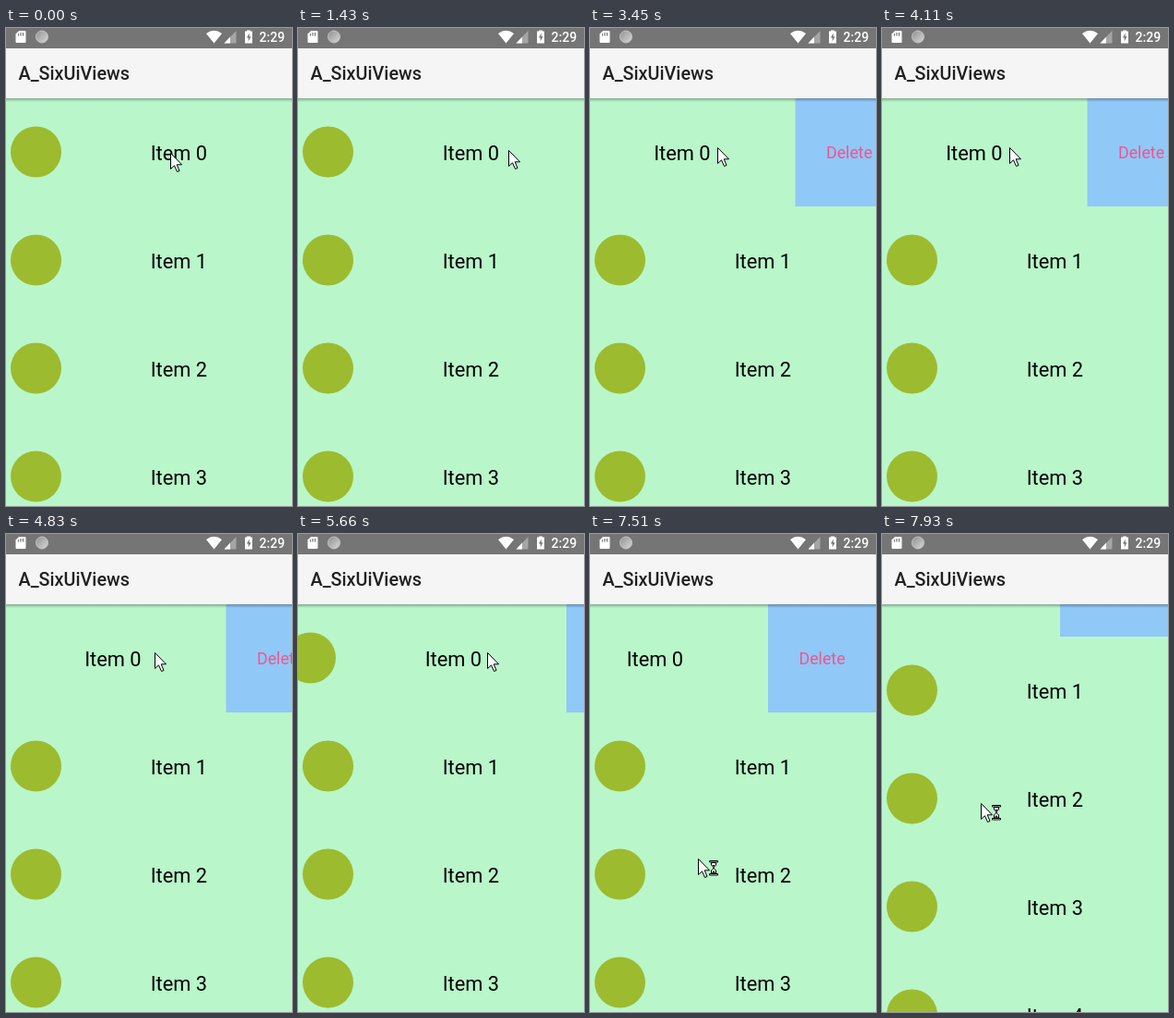
Write an HTML page that moves like this. It is 310 by 517 pixels and loops after 7990 ms.

```html
<!DOCTYPE html>
<html lang="en">
<head>
<meta charset="utf-8">
<title>Swipe to delete</title>
<style>
  html, body { margin: 0; width: 100%; height: 100%; overflow: hidden; background: #b9f6ca; }
  svg { display: block; width: 310px; height: 517px; font-family: Roboto, "Open Sans", sans-serif; }
</style>
</head>
<body>
<svg viewBox="0 0 310 517">
  <defs>
    <linearGradient id="shade" x2="0" y2="1">
      <stop offset="0" stop-color="#000" stop-opacity=".3"/>
      <stop offset="1" stop-color="#000" stop-opacity="0"/>
    </linearGradient>
    <linearGradient id="ball" x2="1" y2="1">
      <stop offset="0" stop-color="#909090"/>
      <stop offset="1" stop-color="#d8d8d8"/>
    </linearGradient>
  </defs>

  <rect width="310" height="517" fill="#b9f6ca"/>
  <g id="list"></g>

  <rect y="76" width="310" height="4" fill="url(#shade)"/>
  <rect y="22" width="310" height="54" fill="#f5f5f5"/>
  <text x="13.5" y="56" font-size="19.8" font-weight="500" fill="#212121">A_SixUiViews</text>

  <rect width="310" height="22" fill="#757575"/>
  <g fill="#fff">
    <path d="M14 3h6.5q1 0 1 1v11q0 1-1 1h-9q-1 0-1-1V6.500z"/>
    <path d="M13.5 6v2.5M16 5v3.5M18.500 5v3.500" stroke="#757575" stroke-width="1.2"/>
    <circle cx="39" cy="9.5" r="6.5" fill="url(#ball)" stroke="#c4c4c4"/>
    <path d="M225.5 16.5L217 6q8.5-6.5 17 0z"/>
    <path d="M249.5 3v13.5h-13z" opacity=".35"/>
    <path d="M243 9.500v7h-6.500z"/>
    <path d="M261 3.500v-1h4v1h2v13h-8v-13z"/>
    <path d="M263.700 5.500l-2.700 5h1.700v4l2.800-5.300h-1.800z" fill="#757575"/>
    <text x="274.500" y="15" font-size="14" font-weight="500">2:29</text>
  </g>

  <g id="cursor">
    <path d="M.5 .5V17.500L4.500 13.800L7.500 20.500L10 19.500L7.200 12.800H12.500Z" fill="#fff" stroke="#000"/>
    <g id="busy" fill="#fff" stroke="#000">
      <path d="M14.500 4.500v2.500l3 3l-3 3v3h5v-3l-3-3l3-3v-2.500z"/>
      <path d="M12.500 2.500h9v1.500h-9zM12.500 16.500h9v1.500h-9z"/>
      <path d="M15.500 7h3l-1.500 2zM15 15.500l2-2.500l2 2.500z" fill="#000" stroke="none"/>
    </g>
  </g>
</svg>
<script>
const LOOP = 7990, STEP = 59.7, ANCHOR = 7930, ROW = 117;
const OPEN = 117, LAG = 45;
const $ = id => document.getElementById(id);

// Tracks are turning points [time, value], joined by cosine easing.
const wiggle = Array.from({ length: 7 }, (_, i) => [2530 + 330 * i, i % 2 ? 84 : OPEN]);
const swipe = [[1430, 0], ...wiggle, [5200, 12], [5400, 20], [5600, 20],
  [6020, 0], [6200, 0], [6920, OPEN]];
const hand = [[910, 178], [1250, 228], [1430, 228], [1550, 222],
  [7000, 222], [7512, 234], [7930, 224]];
const height = [[910, 135], [1250, 132], [2000, 129], [7000, 128], [7660, 381], [8000, 281]];

function at(track, t) {
  const i = track.findIndex(k => k[0] > t);
  if (i < 0) return track[track.length - 1][1];
  if (i === 0) return track[0][1];
  const [t0, a] = track[i - 1], [t1, b] = track[i];
  return a + (b - a) * (1 - Math.cos(Math.PI * (t - t0) / (t1 - t0))) / 2;
}

const row = n => {
  const y = n * ROW;
  return `<g id="row${n}">
    <circle cx="32.5" cy="${y + 134}" r="27.5" fill="#9cbb2f"/>
    <text x="156.7" y="${y + 143}" font-size="21.8">Item ${n}</text>
    ${n ? "" : `<rect x="310" y="76" width="117" height="117" fill="#90c8f8"/>
    <text x="343.500" y="141" font-size="17.800" fill="#f0568c">Delete</text>`}
  </g>`;
};
$("list").innerHTML = [0, 1, 2, 3, 4].map(row).join("");

const move = (id, x, y) => $(id).setAttribute("transform", `translate(${x} ${y})`);

function draw(now) {
  // the screen refreshes in steps
  const t = ANCHOR + Math.floor((now + 10 - ANCHOR) / STEP) * STEP;
  // the row trails the hand that drags it
  const x = at(hand, t) - at(swipe, t + LAG), y = at(height, t);
  const scroll = t > 7660 ? Math.max(0, 373 - y) : 0;
  move("cursor", Math.round(x), Math.round(y));
  move("row0", -Math.round(at(swipe, t) * 2) / 2, 0);
  move("list", 0, -Math.round(scroll));
  $("busy").style.display = now >= 6200 ? "" : "none";
}

const start = performance.now();
function tick() {
  draw((performance.now() - start) % LOOP);
  requestAnimationFrame(tick);
}
tick();
</script>
</body>
</html>
```
